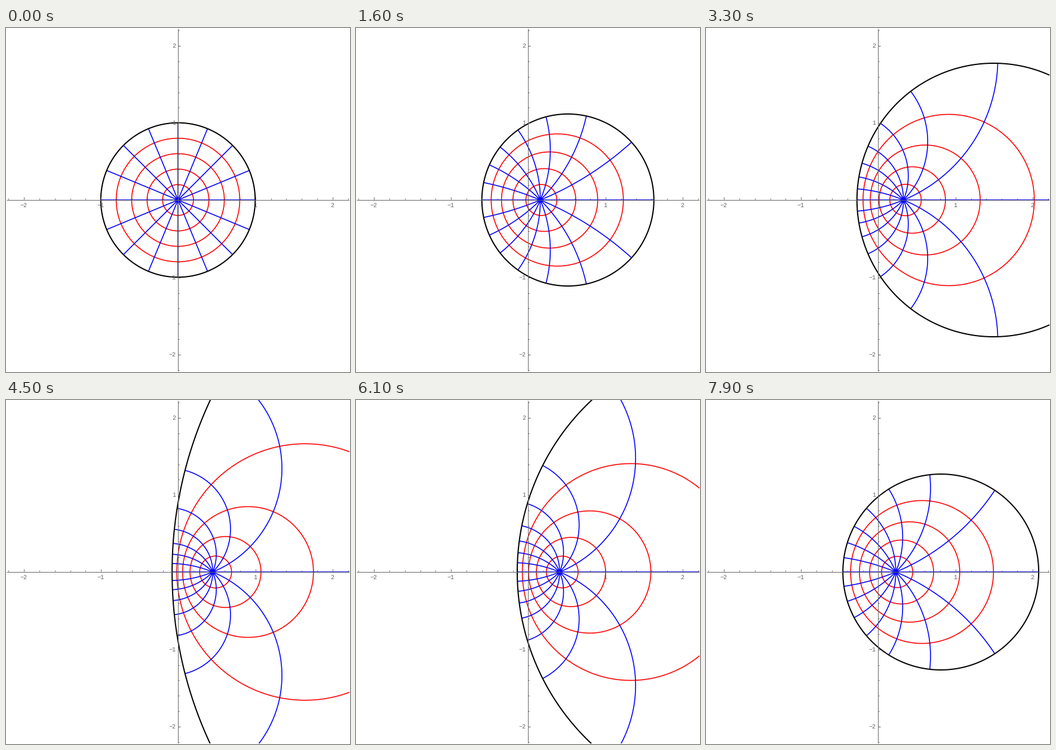
Recreate the animation shown at these times as a matplotlib script. Size 576 by 576 pixels, loop 8 s.

```python
import numpy as np
import matplotlib.pyplot as plt
from matplotlib.animation import FuncAnimation

SIZE, VIEW = 576, 575
MID, UNIT = 288.0, 129.25
GRAY = "#666666"
FRAMES, STEP = 80, 0.02

plt.rcParams["path.simplify"] = False

fig = plt.figure(figsize=(SIZE / 72, SIZE / 72), dpi=72, facecolor="white")
ax = fig.add_axes([0, 1 / SIZE, VIEW / SIZE, VIEW / SIZE])
ax.set_xlim(0, VIEW)
ax.set_ylim(VIEW, 0)
ax.axis("off")


def snap(v):
    """Centre of the pixel that holds the plot coordinate v."""
    return np.floor(MID + UNIT * v) + 0.5


def rule(x, y):
    ax.plot(x, y, color=GRAY, lw=1, solid_capstyle="butt", zorder=5)


def label(x, y, text, ha):
    ax.text(x, y, text, ha=ha, va="baseline", color=GRAY, fontsize=10,
            family="Liberation Mono", zorder=6)


def draw_axes():
    zero = snap(0) - 1
    rule([1, VIEW], [zero, zero])
    rule([zero, zero], [1, VIEW])
    for k in range(-11, 12):
        if k == 0:
            continue
        p, major = snap(k / 5), k % 5 == 0
        size = 4 if major else 2
        rule([p, p], [zero - 0.5, zero - 0.5 - size])
        rule([zero + 0.5, zero + 0.5 + size], [p, p])
        if major:
            n = k // 5
            label(p, 300.5, str(n).replace("-", "\u2212"), "center")
            label(284.5, snap(-n / 1) + 3.5 if n < 0 else snap(-n) + 3.5,
                  str(n).replace("-", "\u2212"), "right")


def chain(parts):
    """Join curves into one path with gaps between them."""
    return np.concatenate([np.append(p, np.nan) for p in parts])


def curve(color, width):
    return ax.plot([], [], color=color, lw=width, solid_joinstyle="round",
                   solid_capstyle="butt")[0]


turn = np.exp(1j * np.linspace(0, 2 * np.pi, 1201))
radius = np.linspace(0, 1, 241)
shapes = [
    (curve("red", 1.6), chain([r * turn for r in (0.2, 0.4, 0.6, 0.8)])),
    (curve("blue", 1.6),
     chain([radius * np.exp(1j * np.pi * k / 8) for k in range(16)])),
    (curve("black", 2), turn),
]


def pole(i):
    """Rises to 1, rests there, then falls back."""
    t = STEP * i if i <= 50 else 1 - STEP * max(0, i - 52)
    return min(t, 0.9999)


def update(i):
    t = pole(i)
    for line, z in shapes:
        w = z / (1 - t * z) + t / 2
        line.set_data(MID + UNIT * w.real, MID - UNIT * w.imag)
    return [line for line, _ in shapes]


draw_axes()
anim = FuncAnimation(fig, update, frames=FRAMES, interval=100,
                     repeat=True, repeat_delay=0, blit=False)
plt.show()
```
